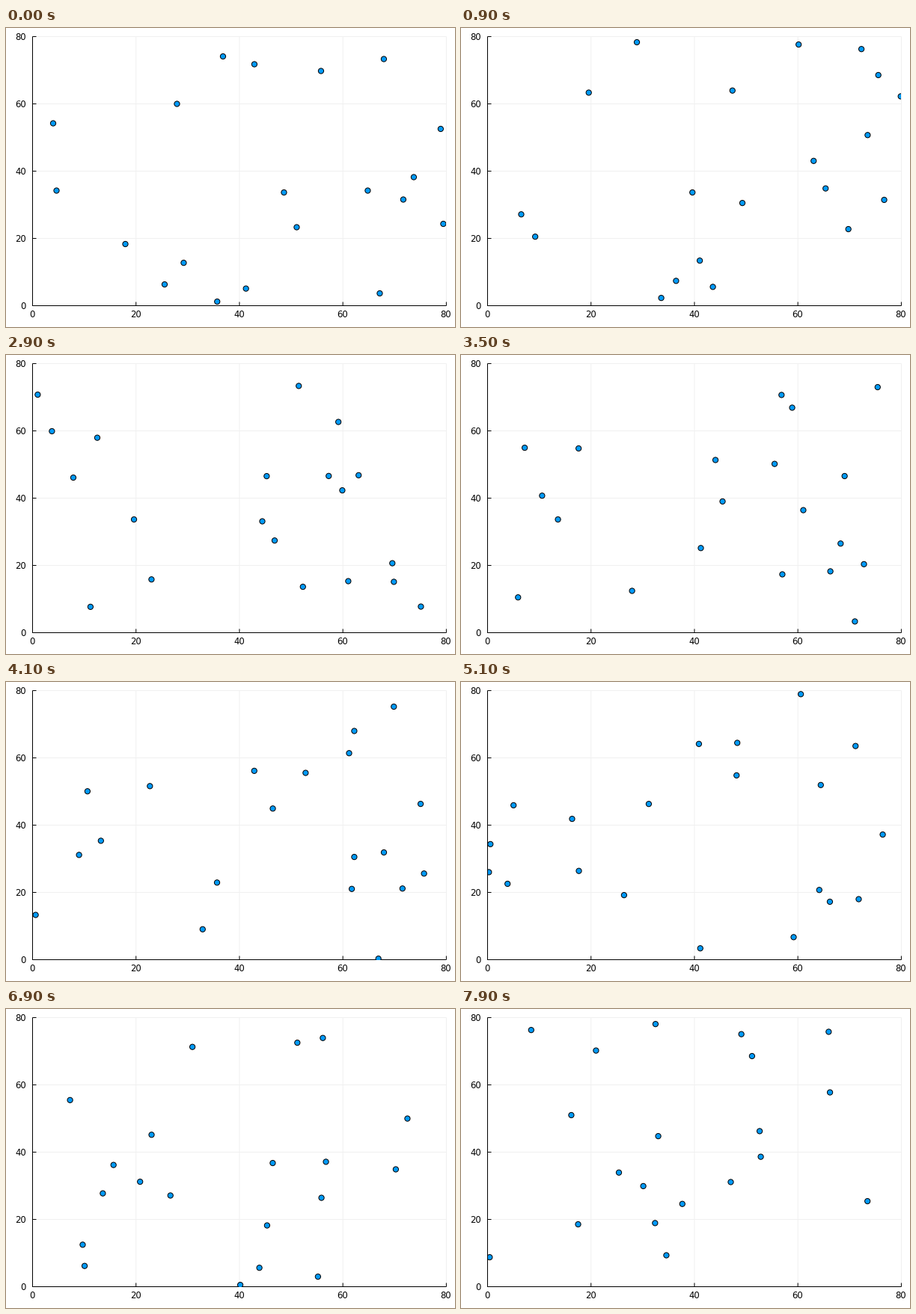
Animation, 600 px wide and 400 px high, one loop 8 s. Source, as a matplotlib script:

```python
import numpy as np
import matplotlib.pyplot as plt
from matplotlib.animation import FuncAnimation
from matplotlib.patches import Rectangle

W, H, DPI = 600, 400, 100
PX = 72 / DPI
LEFT, RIGHT, TOP, BOTTOM = 35.5, 588.4, 11.5, 371.5
SIZE = 80
FRAMES, INTERVAL = 80, 100
REACH, PUSH = 5, 0.5

# start x, y and heading in degrees, in the order in which the walkers move
START = [
    (36.82, 74.11, 152.07), (29.22, 12.75, -36.6), (48.61, 33.67, 180),
    (4.63, 34.22, 253.5), (41.26, 5.09, 135), (64.81, 34.22, 101.3),
    (55.77, 69.78, 60.93), (42.89, 71.78, -60.3), (67.92, 73.33, -32),
    (25.53, 6.33, -26.56), (27.92, 60, 158.2), (3.98, 54.22, 117),
    (17.94, 18.33, 165.9), (73.71, 38.22, 201.9), (79.42, 24.33, 82.8),
    (71.68, 31.56, 257.7), (35.7, 1.22, 29.1), (67.13, 3.67, -55.05),
    (78.91, 52.56, 198.7), (51.07, 23.33, 104.04),
]
# the last two stroll below unit speed until they first swerve
STROLL = np.array([0.636, 0.825])


def simulate():
    """Walkers go straight, swerve away from close ones and wrap at the edges."""
    x, y, heading = np.array(START).T
    pos = np.column_stack([x, y])
    angle = np.radians(heading)
    vel = np.column_stack([np.cos(angle), np.sin(angle)])
    vel[-2:] *= STROLL[:, None]
    track = [pos.copy()]
    for _ in range(FRAMES - 1):
        for i in range(len(pos)):
            away = pos[i] - pos
            near = np.hypot(*away.T) < REACH
            if near.sum() > 1:
                vel[i] += PUSH * away[near].sum(axis=0)
                vel[i] /= np.hypot(*vel[i])
            pos[i] = (pos[i] + vel[i]) % SIZE
        track.append(pos.copy())
    return track


def px(v):
    return LEFT + (RIGHT - LEFT) * v / SIZE


def py(v):
    return BOTTOM - (BOTTOM - TOP) * v / SIZE


def line(x0, y0, x1, y1, color="black", z=2):
    ax.plot([x0, x1], [y0, y1], color=color, lw=PX, snap=False,
            solid_capstyle="butt", zorder=z)


def label(x, y, v, ha):
    ax.text(x, y, str(v), ha=ha, va="baseline", family="DejaVu Sans",
            size=11.6 * PX, color="black")


def offsets(pos):
    return np.column_stack([px(pos[:, 0]), py(pos[:, 1])])


fig = plt.figure(figsize=(W / DPI, H / DPI), dpi=DPI, facecolor="white")
ax = fig.add_axes([0, 0, 1, 1])
ax.axis("off")

for v in range(0, SIZE + 1, 20):
    line(px(v), TOP, px(v), BOTTOM, "#f0f0f0", 1)
    line(LEFT, py(v), RIGHT, py(v), "#f0f0f0", 1)
    line(px(v), BOTTOM, px(v), BOTTOM - 5)
    line(LEFT, py(v), LEFT + 5, py(v))
    label(px(v) - 0.5, 387, v, "center")
    label(27, py(v) + 4.5, v, "right")
line(LEFT, TOP, LEFT, BOTTOM + 0.5)
line(LEFT - 0.5, BOTTOM, RIGHT, BOTTOM)

track = simulate()
# two line widths keep the markers off the pixel grid
dots = ax.scatter(*offsets(track[0]).T, s=(7.2 * PX) ** 2, c="#009af9",
                  edgecolors="black", linewidths=[PX, PX], zorder=3)
dots.set_clip_path(Rectangle((LEFT, TOP), RIGHT - LEFT, BOTTOM - TOP,
                             transform=ax.transData))
ax.set(xlim=(0, W), ylim=(H, 0))


def update(frame):
    dots.set_offsets(offsets(track[frame]))
    return (dots,)


anim = FuncAnimation(fig, update, frames=FRAMES, interval=INTERVAL,
                     repeat=True, repeat_delay=0)
plt.show()
```
